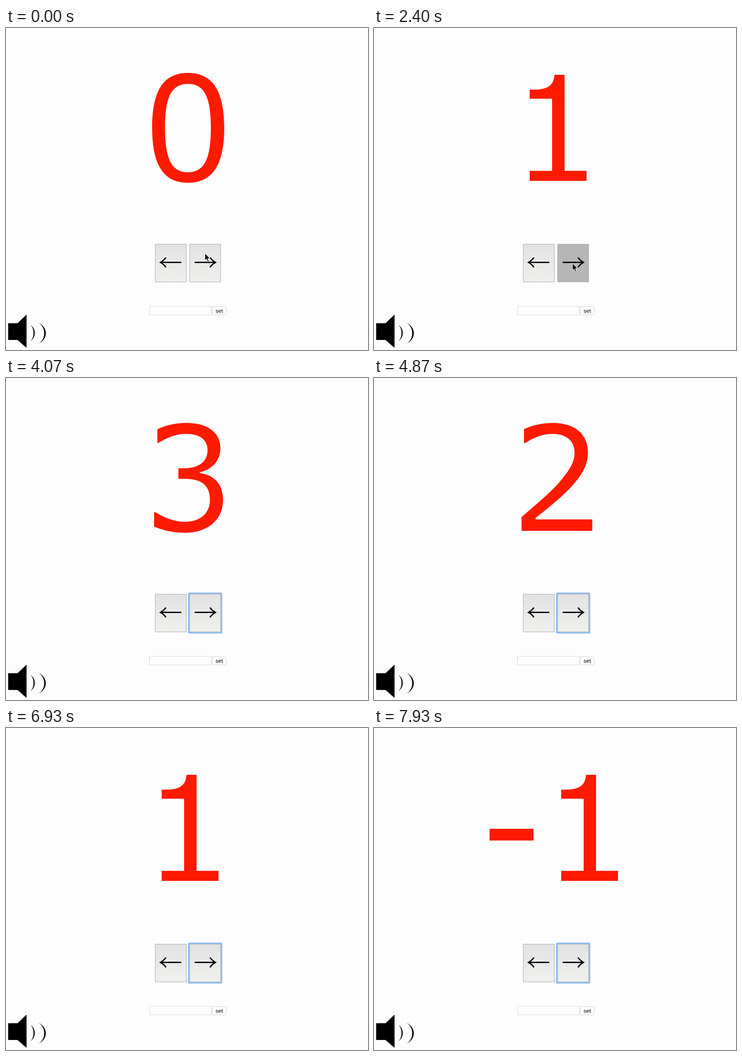
An HTML page for the animation above (8000 ms loop, 758 px wide and 674 px high).

```html
<!DOCTYPE html>
<html lang="en">
<head>
<meta charset="utf-8">
<title>Counter</title>
<style>
  html, body { margin: 0; width: 100%; height: 100%; overflow: hidden; background: #fdfdfd; }
  svg { display: block; width: 758px; height: 674px; }
  .key { fill: url(#face); stroke: #adadb2; }
  .key.pressed { fill: #b6b6b6; }
  .arrow { fill: none; stroke: #000; stroke-width: 2.7; }
  .field { fill: #fdfdfd; stroke: #dadae0; }
  text { font: 11.5px "Liberation Sans", Arial, sans-serif; text-anchor: middle; }
</style>
</head>
<body>
<svg viewBox="0 0 758 674">
  <linearGradient id="face" x2="0" y2="1">
    <stop stop-color="#e2e2e3"/>
    <stop offset="1" stop-color="#f0f0ee"/>
  </linearGradient>

  <path id="number" fill="#ff1a00" fill-rule="evenodd" role="img"/>

  <rect class="key" x="312.5" y="452.5" width="65" height="79"/>
  <rect class="key" id="next" x="384.5" y="452.5" width="65" height="79"/>
  <rect id="ring" x="382.5" y="450.5" width="69" height="83" rx="2" fill="none" stroke="#93c2f3" stroke-width="3"/>
  <path class="arrow" d="M367 490.7H324M335 480.5Q330 487 323.5 490.7Q330 494 335 501"/>
  <path class="arrow" d="M395 490.7H438M427 480.5Q432 487 438.5 490.7Q432 494 427 501"/>

  <rect class="field" x="300.5" y="582.5" width="130" height="18"/>
  <rect x="431.5" y="583.5" width="30" height="17" rx="4" fill="#fff" stroke="#d2d2d4"/>
  <text x="446.5" y="596">set</text>

  <path d="M4.500 618H24L43 600V669.5L24 653H4.500Z"/>
  <path d="M52 622C63 630 63 647 52 655C59.500 647 59.500 630 52 622Z"/>
  <path d="M68 617C88.500 627 88.500 651 68 661C84 651 84 627 68 617Z"/>

  <path id="cursor" d="M0 0V15L3.500 12L6 17.500L8.500 16.500L6 11H10.500Z" stroke="#fff" stroke-width="1"/>
</svg>
<script>
const LOOP = 8000;
const PRESS = 2330, RELEASE = 2530, FIRST_KEY = 3600;

const one = 'M326 129C363 130 376 122 378 98H399V299H445V320H326V299H373V148H326Z';
const shapes = {
  '0': 'M381 94C434 94 457 134 457 209S434 324 381 324S306 284 306 209S328 94 381 94Z' +
       'M381 117C416 117 429 146 429 209S416 302 381 302S333 273 333 209S346 117 381 117Z',
  '1': one,
  '2': 'M314 107C332 99 353 94 374 94C420 94 448 117 448 156C448 181 437 202 411 230' +
       'C391 251 366 271 338 293Q337 296 341 296H457V320H309V291C340 264 372 238 390 216' +
       'C410 192 420 176 420 156C420 132 403 117 374 117C354 117 335 124 317 136H314Z',
  '3': 'M317 107C335 99 355 94 378 94C422 94 449 114 449 147C449 173 431 192 406 197V199' +
       'C436 203 454 222 454.500 254C455 296 423 324 375 324C351 324 329 319 310 311V281H313' +
       'C333 293 352 301 374 301C407 301 427 283 427 255C427 225 410 211 374 211H361V189H372' +
       'C404 189 422 175 422 151C422 129 406 117 377 117C357 117 338 124 319 136H317Z',
  '-1': one.replace('M326', 'M392').replace('C363 130 376 122 378 98', 'C429 130 442 122 444 98')
           .replace(/H(\d+)/g, (_, x) => 'H' + (+x + 66)) + 'M242 211H334V235.500H242Z'
};

// [start time, displayed value]
const counts = [[0, 0], [PRESS, 1], [FIRST_KEY, 2], [3930, 3], [4800, 2], [6530, 1], [7200, 0], [7600, -1]];

const [number, next, ring, cursor] =
  ['number', 'next', 'ring', 'cursor'].map(id => document.getElementById(id));
const show = (el, on) => el.setAttribute('visibility', on ? 'visible' : 'hidden');

function draw(t) {
  const value = counts.filter(([start]) => t >= start).pop()[1];
  number.setAttribute('d', shapes[value]);
  number.setAttribute('aria-label', value);

  next.classList.toggle('pressed', t >= PRESS && t < RELEASE);
  show(ring, t >= FIRST_KEY);
  show(cursor, t < FIRST_KEY);

  const p = Math.min(1, Math.max(0, (t - 70) / 700));
  const ease = p * p * (3 - 2 * p);
  cursor.setAttribute('transform', `translate(${416.5 - ease} ${471.5 + 21 * ease})`);
}

function tick() {
  draw(performance.now() % LOOP);
  requestAnimationFrame(tick);
}
tick();
</script>
</body>
</html>
```
